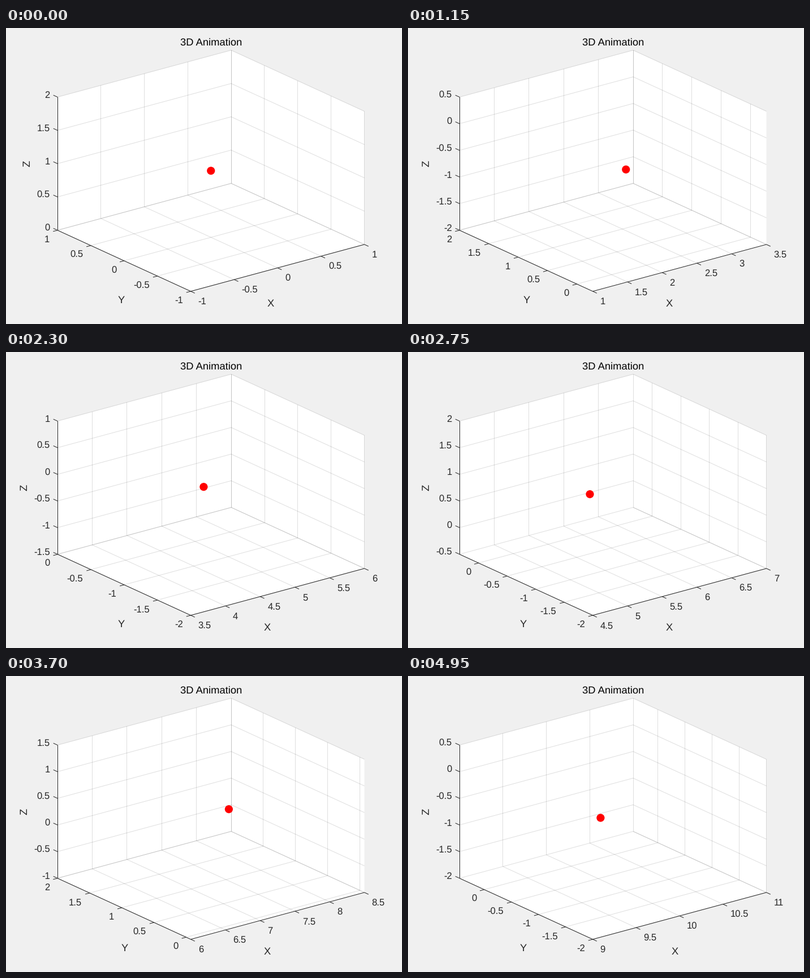
These frames come from a looping animation (700x525 px, 5000 ms). A matplotlib script:

```python
import math

import matplotlib.pyplot as plt
import numpy as np
from matplotlib.animation import FuncAnimation
from matplotlib.collections import LineCollection
from matplotlib.patches import Circle, Polygon

plt.rcParams["font.family"] = "Liberation Sans"
plt.rcParams["text.hinting"] = "none"

W, H, DPI = 700, 525, 100
FRAMES, INTERVAL = 100, 50
PX = 72 / DPI                      # one pixel in points
STEP = 0.5                         # tick spacing on every axis
TICK_FONT, LABEL_FONT = 16.67, 18.33
DARK = (0.15, 0.15, 0.15)
GRID = (*DARK, 0.15)

# Screen vectors of the box, from the front corner along x, y and z
ORIGIN = np.array([326.5, 467.0])
AXES = np.array([[307.0, -83.1], [-235.5, -108.3], [0.0, -236.2]])
TICK = 8.0
UNIT = AXES / np.linalg.norm(AXES, axis=1)[:, None]

fig = plt.figure(figsize=(W / DPI, H / DPI), dpi=DPI, facecolor="0.94")
ax = fig.add_axes([0, 0, 1, 1])
ax.set_xlim(0, W)
ax.set_ylim(H, 0)
ax.axis("off")


def project(u, v, w):
    """Map box fractions to screen pixels."""
    return ORIGIN + np.array([u, v, w]) @ AXES


def line(a, b):
    """Segment between two box points; vertical ones sit on a pixel column."""
    p, q = project(*a), project(*b)
    if abs(p[0] - q[0]) < 1e-6:
        p[0] = q[0] = math.floor(p[0] + 1e-6) + 0.5
    return p, q


def text_width(s):
    em = sum({"-": 0.333, ".": 0.278}.get(c, 0.556) for c in s)
    return em * TICK_FONT


def stepped_limits(c):
    lo = math.floor((c - 1) / STEP + 0.01) * STEP
    return lo, math.ceil((c + 1) / STEP) * STEP


def half_stepped_limits(c):
    """Only the end closer to a whole number is widened."""
    if c % 1 >= 0.5:
        return c - 1, math.ceil(c + 1)
    return math.floor(c - 1), c + 1


def ticks(lo, hi):
    first = math.ceil(lo / STEP - 1e-9)
    last = math.floor(hi / STEP + 1e-9)
    values = np.arange(first, last + 1) * STEP
    return (values - lo) / (hi - lo), [f"{v + 0.0:g}" for v in values]


def add_lines(color, z):
    lines = LineCollection([], colors=[color], linewidths=PX, zorder=z)
    lines.set_snap(False)
    return ax.add_collection(lines, autolim=False)


def add_text(x, y, s, size, **kw):
    return ax.text(x, y, s, fontsize=size * PX, **{"color": DARK, **kw})


hull = [(0, 0, 0), (1, 0, 0), (1, 0, 1), (1, 1, 1), (0, 1, 1), (0, 1, 0)]
ax.add_patch(Polygon([project(*p) for p in hull], fc="white", ec="none", zorder=0))
add_text(362.8, 31, "3D Animation", LABEL_FONT, color="black", ha="center")
x_name = add_text(462, 494.5, "X", LABEL_FONT, ha="center")
y_name = add_text(209, 488.5, "Y", LABEL_FONT, ha="center")
z_name = add_text(37, 240.5, "Z", LABEL_FONT, ha="center",
                  rotation=90, rotation_mode="anchor")
grid = add_lines(GRID, 1)
frame_lines = add_lines(DARK, 2)
ball = ax.add_patch(Circle((0, 0), 7.1, fc="red", ec="none", zorder=3))
labels = []


def put_labels(points, names, dx, dy, right):
    """Write tick labels and return the widest one's width."""
    for (x, y), s in zip(points, names):
        left = x + dx - (text_width(s) if right else 0)
        labels.append(add_text(left, y + dy, s, TICK_FONT))
    return max(map(text_width, names))


def draw(k):
    t = 10 * k / (FRAMES - 1)
    pos = np.array([t, math.sin(t), math.cos(t)])
    limits = [stepped_limits(pos[0]), half_stepped_limits(pos[1]),
              stepped_limits(pos[2])]
    (fx, nx), (fy, ny), (fz, nz) = [ticks(*lim) for lim in limits]

    grid.set_segments(
        [line((u, 1, 0), (u, 1, 1)) for u in fx]
        + [line((u, 0, 0), (u, 1, 0)) for u in fx]
        + [line((1, v, 0), (1, v, 1)) for v in fy]
        + [line((0, v, 0), (1, v, 0)) for v in fy]
        + [line((0, 1, w), (1, 1, w)) for w in fz]
        + [line((1, 0, w), (1, 1, w)) for w in fz])

    px = [project(u, 0, 0) for u in fx]
    py = [project(0, v, 0) for v in fy]
    pz = [project(0, 1, w) for w in fz]
    frame_lines.set_segments(
        [line((0, 0, 0), (1, 0, 0)), line((0, 0, 0), (0, 1, 0)),
         line((0, 1, 0), (0, 1, 1))]
        + [(p, p - TICK * UNIT[1]) for p in px]
        + [(p, p - TICK * UNIT[0]) for p in py]
        + [(p, p + TICK * UNIT[1]) for p in pz])

    while labels:
        labels.pop().remove()
    wx = put_labels(px, nx, 13.2, 23.5, False)
    wy = put_labels(py, ny, -13.6, 21.5, True)
    wz = put_labels(pz, nz, -13.4, 1.5, True)
    x_name.set_x(439 + wx)
    y_name.set_x(232.5 - wy)
    z_name.set_x(66 - wz)

    ball.center = project(*[(c - lo) / (hi - lo)
                            for c, (lo, hi) in zip(pos, limits)])
    return [grid, frame_lines, ball, *labels]


anim = FuncAnimation(fig, draw, frames=FRAMES, interval=INTERVAL,
                     init_func=lambda: draw(0), repeat=True, repeat_delay=0)
plt.show()
```
